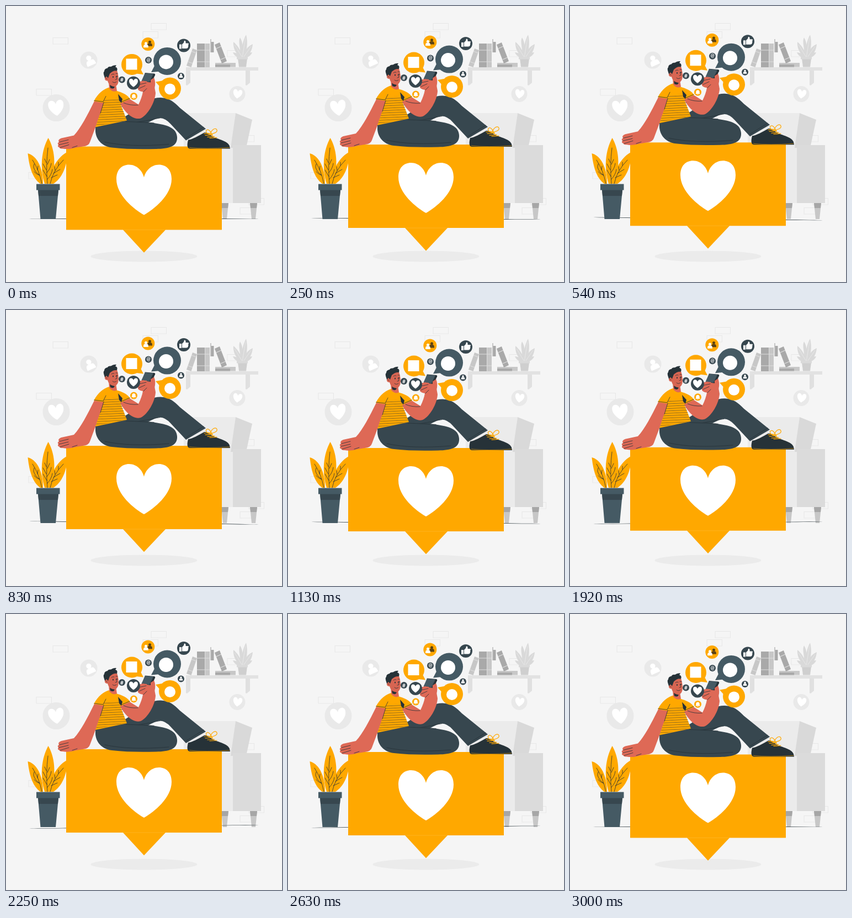
Write an HTML page that moves like this. It is 500 px wide and 500 px high and loops after 3.04 s.

```html
<!DOCTYPE html>
<html lang="en">
<head>
<meta charset="utf-8">
<title>Social media break</title>
<style>
  html, body { margin: 0; width: 100%; height: 100%; overflow: hidden; background: #f5f5f5; }
  svg { display: block; width: 100vw; height: 100vh; }
  text { font-family: Lato, "Open Sans", sans-serif; font-weight: 700; text-anchor: middle; fill: #fff; }
  .orange { fill: #ffa800; }
  .slate { fill: #455a64; }
  .navy { fill: #37474f; }
  .ink { fill: #263238; }
  .skin { fill: #de6956; }
  .white { fill: #fff; }
  .line { fill: none; stroke: #263238; stroke-width: .8; stroke-linecap: round; stroke-linejoin: round; }
  .lace { fill: none; stroke: #ffa800; stroke-width: 1.2; stroke-linecap: round; }
</style>
</head>
<body>
<svg viewBox="0 0 500 500">
  <defs>
    <path id="heart" d="M0 45C-18 35-50 9-50-20C-50-37-40-46-27-46C-13-46-3-35 0-23C3-35 13-46 27-46C40-46 50-37 50-20C50 9 18 35 0 45Z"/>
    <g id="person">
      <circle cy="-2.6" r="2.4"/>
      <path d="M-4.3 4.6C-4.3-1-2.5-.4 0-.4S4.3-1 4.3 4.6Z"/>
    </g>
    <g id="sofaLeg">
      <path fill="#c7c7c7" d="M0 0H13L10 29H3Z"/>
      <path fill="#a6a6a6" d="M0 0H13L12 9H1Z"/>
    </g>
    <path id="bracket" d="M0 0H8V22L2 27L0 26Z"/>
    <pattern id="stripes" width="10" height="4.3" patternUnits="userSpaceOnUse" patternTransform="rotate(-2.5)">
      <path d="M0 2H10" stroke="#263238" stroke-width=".55"/>
    </pattern>
  </defs>

  <rect width="500" height="500" fill="#f5f5f5"/>

  <g id="frames" fill="none" stroke="#e6e6e6" stroke-width=".9"></g>

  <!-- shelf -->
  <g fill="#e0e0e0">
    <use href="#bracket" x="326" y="117"/>
    <use href="#bracket" x="434" y="117"/>
    <rect x="326" y="111" width="131" height="6" fill="#e2e2e2"/>
  </g>
  <g fill="#c7c7c7">
    <path d="M338 77L346 80L335.500 111L327 108Z"/>
    <rect x="360.500" y="68" width="8.500" height="43"/>
    <rect x="370" y="60" width="2" height="24"/>
    <rect x="379" y="103" width="37" height="7.500"/>
    <g fill="#a9a9a9">
      <rect x="346" y="68" width="14" height="43"/>
      <rect x="371.500" y="65" width="5" height="19"/>
      <path d="M378 70L387 66L400 100L391 104Z"/>
      <rect x="379" y="106" width="27" height="4.500"/>
    </g>
  </g>
  <path d="M336 82L344 85M330 101L338 104M346 80H369M346 101H369M381 77L390 73M389 97L398 93" stroke="#dedede" stroke-width="1.200"/>
  <g fill="#d9d9d9">
    <path d="M427 94C426 78 429 62 435 52C439 68 436 84 430 94Z"/>
    <path d="M427 94C416 87 411 76 412 65C421 73 427 83 429 94Z"/>
    <path d="M429 94C431 81 438 73 447 69C446 81 440 90 431 95Z"/>
    <path d="M425 93C425 75 420 65 424 57C430 67 430 80 429 94Z"/>
    <path d="M411 84C420 85 425 89 427 94C420 94 414 91 411 84ZM446 84C437 84 432 89 430 94C437 94 443 91 446 84Z"/>
    <path fill="none" stroke="#f0f0f0" stroke-width=".6" d="M428 94L434 57M428 93L414 70M430 93L444 73"/>
    <path fill="#cfcfcf" d="M420 95H437L435 110.500H422Z"/>
    <rect x="418" y="92" width="20" height="4.500" fill="#dadada"/>
  </g>

  <!-- sofa -->
  <path fill="#ebebeb" d="M322 201Q323 194 331 194H416L409 252H412V357H322Z"/>
  <path fill="#d9d9d9" d="M416 194L446 206L435 257H407Z"/>
  <rect x="411" y="252" width="51" height="105" fill="#dbdbdb"/>
  <use href="#sofaLeg" x="390" y="357"/>
  <use href="#sofaLeg" x="442" y="357"/>

  <!-- faded badges -->
  <g fill="#e9e9e9">
    <circle cx="91" cy="184.500" r="24.500"/>
    <circle cx="150" cy="98" r="15.500"/>
    <circle cx="419" cy="159.500" r="14.500"/>
  </g>
  <g class="white">
    <use href="#heart" transform="translate(91 185) rotate(-7) scale(.28 .31)"/>
    <use href="#heart" transform="translate(419.500 159.500) rotate(9) scale(.165 .18)"/>
    <use href="#person" transform="translate(152 99) rotate(-24) scale(1.950)"/>
  </g>

  <ellipse id="floor" class="ink" cx="250" cy="385.500" rx="208" ry=".5"/>
  <ellipse cx="250" cy="453.500" rx="96.500" ry="10" fill="#ebebeb"/>

  <!-- potted plant -->
  <g class="orange">
    <path d="M39.500 267C55 271 67 291 67 322H62C47 311 42 290 39.500 267Z"/>
    <path d="M112 264C95 272 79 296 77 322H86C101 312 110 293 112 264Z"/>
    <path d="M76.500 239C87 256 94 292 78 322H70C61 293 64 262 76.500 239Z"/>
  </g>
  <path class="line" stroke-width="1" d="M48 279Q60 297 65 322M76 257Q72 288 75 322M104 279Q85 298 80 322M51 286L50 292Q52 300 60 306M57 297L58 290M73 284L70 277M73 297L67 286M74 309L67 297M74 302Q81 294 82 285M75 314Q83 305 84 296M75 287L79 278M95 289L95 283M89 298L88 291M86 303L98 296M82 311L93 306M61 307Q54 304 51 300"/>
  <path class="slate" d="M58 333H95L90 386H62.500Z"/>
  <path class="navy" d="M58 333H95L94 344H59Z"/>
  <rect class="slate" x="55" y="322.500" width="42.500" height="11"/>

  <g id="floating">
    <!-- like notification -->
    <path class="orange" d="M109 254H391V405H109ZM212 405H289L250 446.300Z"/>
    <path d="M212 405H289" stroke="#ffc24d" stroke-width=".4"/>
    <use href="#heart" class="white" transform="translate(250 333)"/>

    <!-- bent leg and shoe -->
    <path class="navy" d="M209 203C228 196 252 165 280 165.500C296 166 304 173 315 184L362 222L326 243L298 213Q289 203 279 202.500C271 203 265 207 257 211L240 218Z"/>
    <path class="line" d="M219 211C245 211 262 205 279 202.500M326 239L358 219"/>
    <path class="ink" d="M330 242C338 241 348 235 359 229C364 228 369 232 374 236C384 241 402 244 405 253L406 258H333Q326 257 330 242Z"/>
    <path d="M332 256Q360 259 405 256" fill="none" stroke="#ffa800" stroke-width=".6"/>
    <path class="lace" d="M359 231L369 230M361 234L374 233M365 237L378 236M369 239L382 238M370 232C372 223 380 219 382 224S374 231 370 232M370 232C364 232 360 226 364 224S371 228 375 236"/>

    <!-- folded leg -->
    <path class="navy" d="M163 215L216 206C225 210 246 209 268 211.500C292 215 309 220 310 237C311 254 295 258 272 258.500C243 259 217 259 192 256C171 254 158 236 163 215Z"/>
    <path class="line" d="M162 220Q167 212 181 211M179 246Q224 256 295 250M217 209Q248 210 268 211.500"/>

    <!-- supporting arm -->
    <path class="skin" d="M160 172L179 174L152 246Q150 253 139 254L127 256Q113 260 103 258Q97 258 97 256Q92 254 95 251Q92 248 96 246Q93 242 100 239L123 234C136 220 147 198 160 172Z"/>
    <path class="line" d="M97 246L113 242M96 251L113 247M98 256L114 251M120 256L129 253"/>

    <!-- phone hand -->
    <path class="skin" d="M206 175L224 168L240 178Q246 166 248 155Q238 153 239 149Q235 145 240 143Q236 139 243 137L262 130Q270 136 269 146L271 157C270 174 257 197 244 203C230 207 215 192 206 175Z"/>
    <path class="line" d="M213 175Q224 180 239 179M240 143L250 139M241 149L252 144M249 155L255 149"/>
    <path class="ink" d="M252 120.500L269 122Q271 123 270 125L263 138L246 136Z"/>
    <path class="slate" d="M252 121L267 122.500L260 137L245.500 135Z"/>
    <path class="skin" d="M239 139Q241 136 248 135L255 136Q258 138 253 140L246 144H240ZM262 133L268 129Q272 138 269 149L262 147Z"/>
    <path class="line" d="M240 142L254 139M262 133L268 129"/>

    <!-- shirt -->
    <path class="orange" d="M187 147C177 150 167 157 159 172L177 175L162 219L219 207L207 176L225 168C219 159 209 156 200 153Z"/>
    <path fill="url(#stripes)" d="M178 168L203 166L211 182L218 207L163 217L177 175Z"/>
    <path class="line" d="M160 171L176 173L181 163M177 174L171 194M208 174L224 167"/>
    <path class="ink" d="M203 159L211 168L209 175L205 171Z"/>

    <!-- head -->
    <path class="skin" d="M186 137L199 141L201 153Q194 157 187 149Z"/>
    <path class="ink" d="M188 142L197 146Q195 151 189 148Z"/>
    <path fill="#d76552" d="M183 119L201 116Q205 128 203.500 138Q201 147 193 145Q186 143 184 135Q178 135 179 129Q181 125 184 128Z"/>
    <path class="ink" d="M179 130C178 126 175 120 178 118Q178 113 184 112Q185 109 190 109.500Q195 106 200 107L198 110Q203 111 201 117Q194 116 188 122L185 130L182 127Z"/>
    <g class="ink">
      <ellipse cx="194" cy="128" rx="1" ry="1.500"/>
      <ellipse cx="201" cy="127" rx=".9" ry="1.500"/>
    </g>
    <path class="line" d="M191 124Q193 122 196 123M199 122L202 122M199 127Q201 131 201 132L198 133M193 137Q196 140 200 137M181 130L183 132"/>

    <!-- bubbles -->
    <path class="orange" d="M244 114L249 123.500L236 122Z"/>
    <circle class="orange" cx="228" cy="105.500" r="19"/>
    <rect class="white" x="217.500" y="95" width="20" height="20"/>

    <path class="slate" d="M269 108L263 119.500L279 118Z"/>
    <circle class="slate" cx="292" cy="99.500" r="25"/>
    <circle class="white" cx="290" cy="101" r="13"/>

    <path class="orange" d="M288 134L271 137L280 147Z"/>
    <circle class="orange" cx="297" cy="149" r="20"/>
    <circle class="white" cx="297" cy="150" r="10"/>

    <circle class="orange" cx="257.300" cy="68.500" r="12"/>
    <use href="#person" transform="translate(260.500 67.500) scale(1.050)" fill="#5b4213"/>
    <use href="#person" class="white" transform="translate(253.500 70) scale(1.050)"/>

    <circle class="navy" cx="322" cy="71" r="12"/>
    <path class="white" d="M314 69H318V77H314ZM319 69L322 66L323 62.500Q326 62 325.500 67H330Q332 68 330 70Q331 72 330 73Q330 76 327 76.500H319Z"/>

    <circle class="navy" cx="231" cy="139" r="12"/>
    <use href="#heart" class="white" transform="translate(231 139) scale(.16 .165)"/>

    <circle class="navy" cx="258" cy="97.500" r="6"/>
    <text x="258" y="100.200" font-size="8.500">@</text>
    <circle class="navy" cx="210" cy="133" r="6"/>
    <text x="210" y="136.800" font-size="10">#</text>
    <circle class="navy" cx="317" cy="126.500" r="6"/>
    <use href="#person" class="white" transform="translate(317 126) scale(.76)"/>

    <circle class="orange" cx="231.500" cy="163" r="6.500"/>
    <path class="white" d="M228.300 164.500V162Q228.800 159 231.500 159T234.700 162V164.500L236 166H227ZM230.200 166.500H232.800L231.500 167.800Z"/>
  </g>
</svg>
<script>
  const SVG_NS = "http://www.w3.org/2000/svg";
  const LOOP = 3040;
  const FLOAT_PERIOD = 1500;
  const LEAD = 20;
  const REST = 0.7;

  const frames = document.getElementById("frames");
  const floating = document.getElementById("floating");
  const floor = document.getElementById("floor");

  const corners = [[85, 57], [55, 150], [263, 31], [248, 46], [401, 80], [41, 301], [422, 234], [424, 365], [440, 348]];
  for (const [x, y] of corners) {
    const rect = document.createElementNS(SVG_NS, "rect");
    const box = { x, y: y + 0.5, width: 27.5, height: 11.5 };
    for (const key in box) rect.setAttribute(key, box[key]);
    frames.append(rect);
  }

  // Triangle wave from -1 to 1, starting at -1.
  function triangle(phase) {
    const p = phase - Math.floor(phase);
    return 1 - 4 * Math.abs(p - 0.5);
  }

  function draw(now) {
    const t = now % LOOP + LEAD;
    const lift = 5 * (1 + triangle(t / FLOAT_PERIOD));
    const tilt = triangle(t / (2 * FLOAT_PERIOD) + 0.25);
    floating.setAttribute("transform", `translate(0 ${REST - lift})`);
    floor.setAttribute("transform", `rotate(${tilt} 250 385.5)`);
  }

  const start = performance.now();
  function tick() {
    draw(performance.now() - start);
    requestAnimationFrame(tick);
  }
  tick();
</script>
</body>
</html>
```
